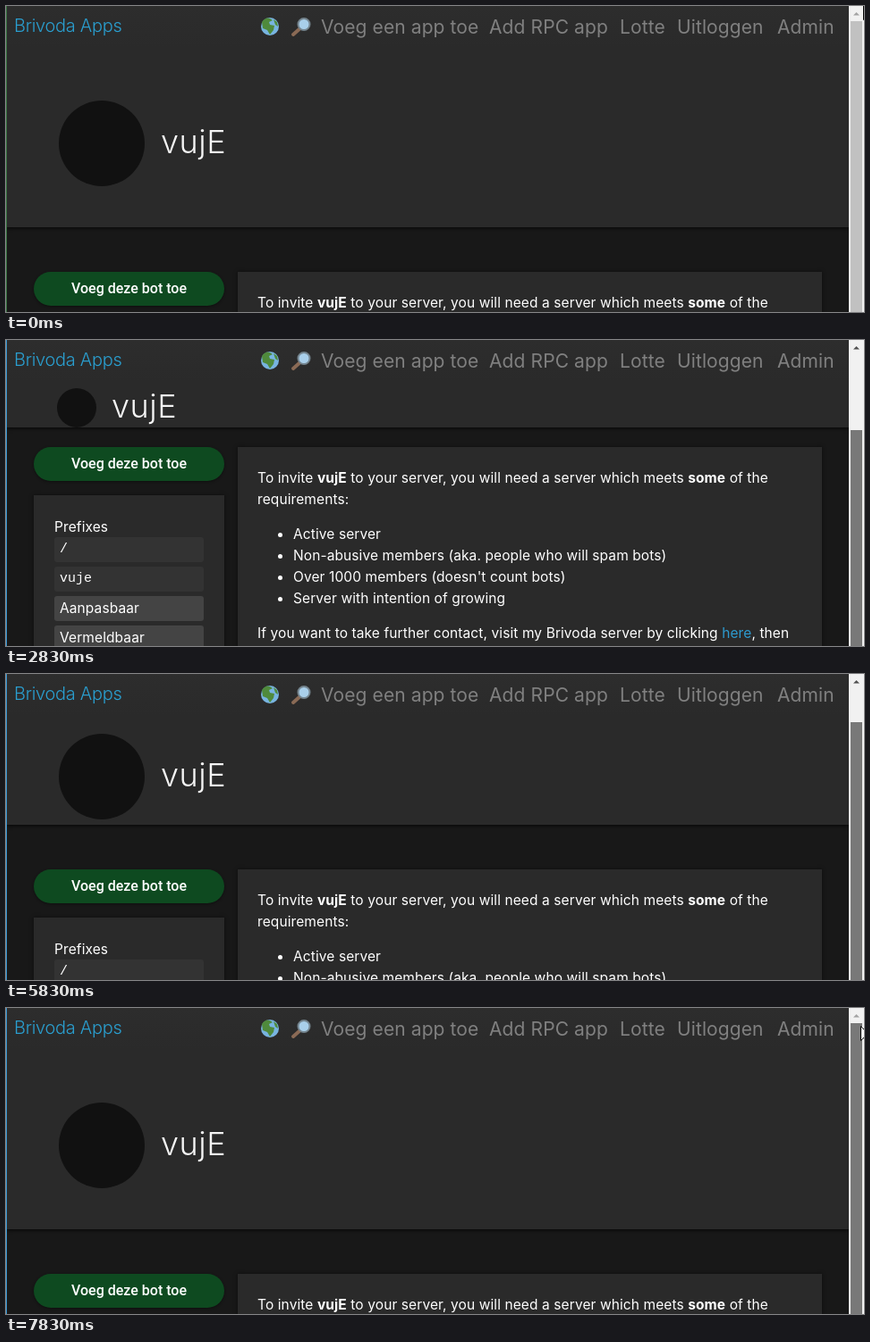
These frames come from a looping animation (959 px wide and 343 px high, 8000 ms). An HTML page:

```html
<!DOCTYPE html>
<html lang="nl">
<head>
<meta charset="utf-8">
<style>
  html, body { margin: 0; width: 100%; height: 100%; overflow: hidden; background: #181818; }
  body { position: relative; font: 15.5px/24px Inter, sans-serif; letter-spacing: .1px; color: #fff; }
  div, svg { position: absolute; white-space: nowrap; }
  #page { left: 0; top: 0; width: 942px; height: 700px; }
  .panel { background: #2a2a2a; box-shadow: 0 0 4px #0008; }
  .button { background: #0e4a20; border-radius: 19px; box-shadow: 0 1px 3px #0006;
    font: 500 16px/38px Roboto, sans-serif; letter-spacing: 0; text-align: center; }
  .code, .badge { border-radius: 3px; line-height: 28px; text-indent: 6px; }
  .code { background: #333; font: 15px/27px "Liberation Mono", monospace; letter-spacing: 0; }
  .badge { background: #444; }
  .dot { background: #fff; border-radius: 50%; }
  a { color: #2d9bd0; }
  #header { left: 0; top: 0; width: 942px; background: #2a2a2a; overflow: hidden; }
  #shade { left: 0; top: 0; width: 942px; box-shadow: 0 1px 4px #000c; }
  #avatar { background: #111; border-radius: 50%; }
  #title { font-size: 36px; font-weight: 300; letter-spacing: .5px; line-height: 48px; color: #f4f4f4; }
  #nav { left: 0; top: 0; width: 942px; height: 47px; background: linear-gradient(#2d2d2d, #2a2a2a); }
  .link { font-size: 21px; color: #808080; }
  .brand { font-size: 20px; font-weight: 300; letter-spacing: -.3px; color: #2a9fd0; }
  #edge { left: 0; top: 0; width: 1px; height: 343px; }
  #track { left: 942px; top: 0; width: 17px; height: 343px; background: #f1f1f1; }
  #thumb { left: 2px; width: 13px; height: 400px; }
  #icons { left: 280px; top: 8px; }
  #cursor { left: 0; top: 0; }
</style>
</head>
<body>
<div id="page"></div>
<div id="shade"></div>
<div id="header"><div id="avatar"></div><div id="title">vujE</div></div>
<div id="nav">
  <svg id="icons" width="70" height="32">
    <circle cx="15" cy="15" r="10" fill="#78b4e0"/>
    <path d="M6 10q4-6 9-4l3 2-4 2 1 3 5 1-1 5-4 5-3-5-5-2zM19 7l4 3 1 5-3-2z" fill="#4f8a3c"/>
    <path d="M50 16l-9 8" stroke="#8a6a55" stroke-width="4" stroke-linecap="round"/>
    <circle cx="53" cy="12.500" r="6.500" fill="#a9cfea" stroke="#75858f" stroke-width="2"/>
  </svg>
</div>
<div id="edge"></div>
<div id="track">
  <div id="thumb"></div>
  <svg width="17" height="17"><path id="arrow" d="M5 10.500L8.500 7l3.500 3.500z"/></svg>
</div>
<svg id="cursor" width="14" height="21"><path d="M.5.5v16l3.700-3.500 2.500 6 2.500-1-2.500-5.800h5.200z" fill="#fff" stroke="#000"/></svg>
<script>
const $ = id => document.getElementById(id);

function put(parent, cls, x, y, html = '', w, h) {
  const el = document.createElement('div');
  el.className = cls;
  el.innerHTML = html;
  el.style.cssText = `left:${x}px;top:${y}px;` + (w ? `width:${w}px;height:${h}px` : '');
  $(parent).append(el);
}
// Places a line of text by its vertical centre
const line = (x, y, html, parent = 'page', cls = '') => put(parent, cls, x, y - 12, html);

put('page', 'button', 31, 298, 'Voeg deze bot toe', 213, 38);
put('page', 'panel', 31, 352, '', 213, 340);
put('page', 'panel', 259, 298, '', 653, 400);
line(54, 388, 'Prefixes');
[['code', '/'], ['code', 'vuje'], ['badge', 'Aanpasbaar'], ['badge', 'Vermeldbaar']]
  .forEach(([cls, text], i) => put('page', cls, 54, 399 + 33 * i, text, 167, 28));
line(281, 333, 'To invite <b>vujE</b> to your server, you will need a server which meets <b>some</b> of the');
line(281, 357, 'requirements:');
['Active server', 'Non-abusive members (aka. people who will spam bots)',
  "Over 1000 members (doesn't count bots)", 'Server with intention of growing'].forEach((text, i) => {
  put('page', 'dot', 304, 394 + 24 * i, '', 5, 5);
  line(321, 396 + 24 * i, text);
});
line(281, 507, 'If you want to take further contact, visit my Brivoda server by clicking <a>here</a>, then');

line(9, 22, 'Brivoda Apps', 'nav', 'brand');
[[352, 'Voeg een app toe'], [540, 'Add RPC app'], [686, 'Lotte'], [750, 'Uitloggen'], [862, 'Admin']]
  .forEach(([x, text]) => line(x, 23.5, text, 'nav', 'link'));

// Key points: [tick, value...], 12 ticks per second
const SCROLL = [[14, 0], [23, 61], [24, 68], [34, 178], [39, 178], [40, 57], [41, 57], [45, 23], [47, 23],
  [48, 0], [52, 0], [54, 90], [57, 170], [61, 0], [66, 0], [70, 79], [76, 164], [78, 181], [80, 181],
  [89, 43], [94, 0]];
const CURSOR = [[1, 958, -1], [10, 946, 38], [14, 946, 38], [23, 941, 65], [24, 943, 69], [28, 960, 85],
  [79, 960, 121], [80, 958, 121], [89, 956, 57], [94, 955, 20]];

function at(keys, tick, n = 1) {
  const i = keys.findIndex(k => k[0] >= tick);
  if (i < 1) return keys[i ? keys.length - 1 : 0][n];
  const a = keys[i - 1], b = keys[i];
  return a[n] + (b[n] - a[n]) * (tick - a[0]) / (b[0] - a[0]);
}

function draw() {
  const tick = Math.floor((performance.now() % 8000 + 3.4) * .012);
  const scroll = Math.round(at(SCROLL, tick));
  const shrink = Math.min(scroll, 150), small = scroll > 100;
  const size = small ? 44 : 96;
  const middle = (small ? 150.5 : 154) - shrink / 2;

  $('page').style.transform = `translateY(${-scroll}px)`;
  $('header').style.height = $('shade').style.height = 248 - shrink + 'px';
  Object.assign($('avatar').style, {
    left: (small ? 57 : 59) + 'px', top: middle - size / 2 + 'px', width: size + 'px', height: size + 'px'
  });
  Object.assign($('title').style, { left: (small ? 118 : 173) + 'px', top: middle - 26 + 'px' });

  $('edge').style.background = tick < 15 ? '#3c7a46' : '#3a9ad9';
  $('thumb').style.top = Math.round(17 + scroll * .47) + 'px';
  $('thumb').style.background = tick < 5 ? '#c1c1c1' : tick < 15 ? '#a8a8a8' : '#787878';
  $('arrow').style.fill = scroll ? '#505050' : '#a3a3a3';
  $('cursor').style.transform =
    `translate(${Math.round(at(CURSOR, tick))}px,${Math.round(at(CURSOR, tick, 2))}px)`;
  requestAnimationFrame(draw);
}
draw();
</script>
</body>
</html>
```
